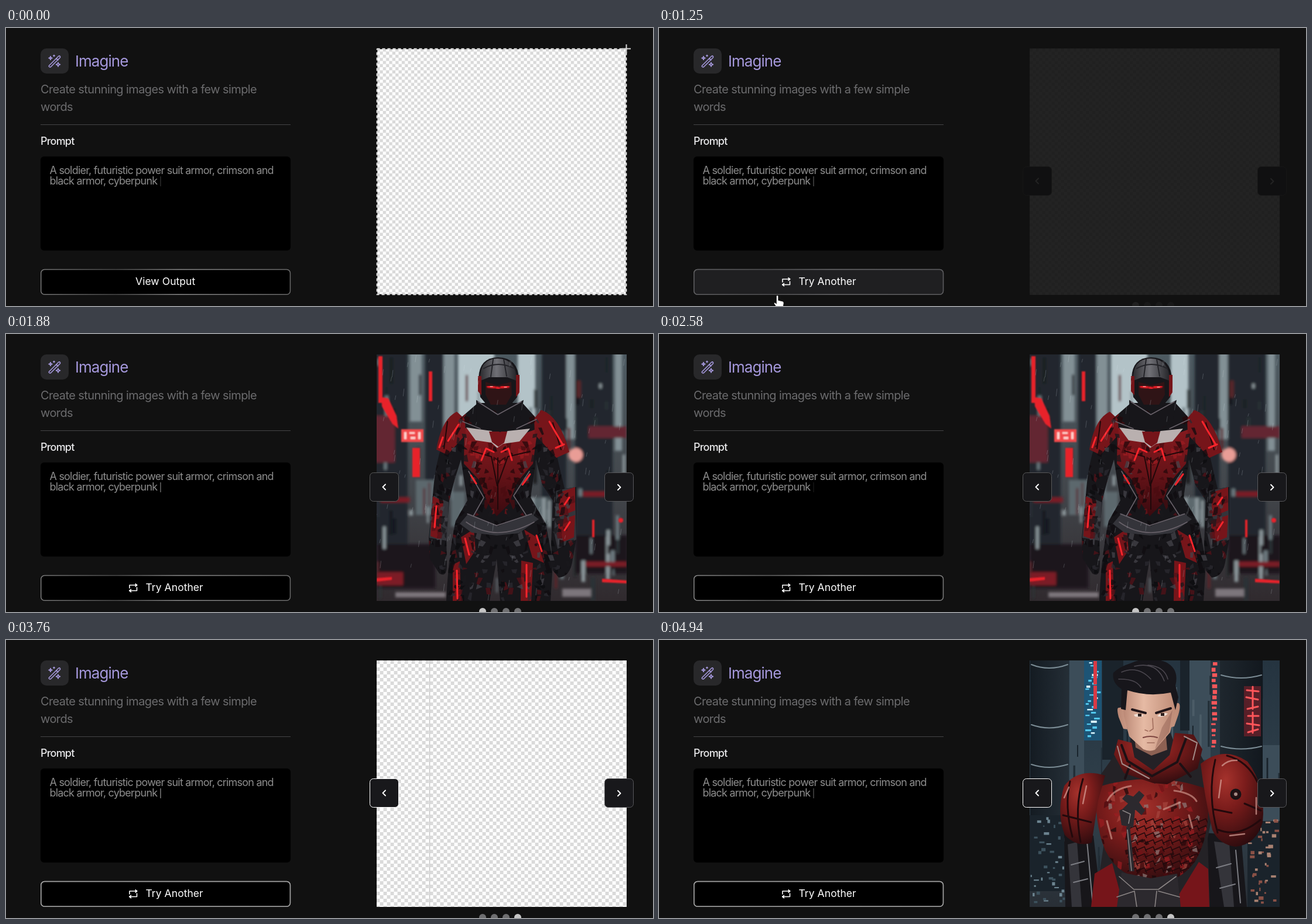
These frames come from a looping animation (1105 by 476 pixels, 5.01 s). An HTML page:

```html
<!DOCTYPE html>
<html lang="en">
<head>
<meta charset="utf-8">
<title>Imagine</title>
<style>
html,body{margin:0;width:100%;height:100%;overflow:hidden;background:#111}
svg{display:block;width:100vw;height:100vh}
text{font-family:Inter,Roboto,sans-serif;white-space:pre}
.line{fill:none;stroke-linecap:round;stroke-linejoin:round}
.steel{fill:#34343a}.dark{fill:#17161a}.red{fill:#76151a}.hot{fill:#e8232b}
</style>
</head>
<body>
<svg viewBox="0 0 1105 476" xmlns="http://www.w3.org/2000/svg">
<defs>
  <pattern id="fine" x="633" y="35" width="10.7" height="10.7" patternUnits="userSpaceOnUse">
    <path fill="#fff" d="M0 0h10.7v10.7H0z"/><path fill="#d9d9d9" d="M0 0h5.35v5.35H0zM5.35 5.35h5.35v5.35H5.35z"/>
  </pattern>
  <pattern id="coarse" x="633" y="35" width="12" height="12" patternUnits="userSpaceOnUse">
    <path fill="#fff" d="M0 0h12v12H0z"/><path fill="#dadada" d="M0 0h6v6H0zM6 6h6v6H6z"/>
  </pattern>
  <linearGradient id="rim"><stop stop-color="#777"/><stop offset=".3" stop-color="#4a4a4a"/><stop offset=".55" stop-color="#8c8c8c"/><stop offset="1" stop-color="#6a6a6a"/></linearGradient>
  <linearGradient id="street" x2="0" y2="1"><stop stop-color="#4d5a61"/><stop offset=".55" stop-color="#42464b"/><stop offset="1" stop-color="#302a2e"/></linearGradient>
  <linearGradient id="night" x2="0" y2="1"><stop stop-color="#253440"/><stop offset=".6" stop-color="#30404b"/><stop offset="1" stop-color="#292f36"/></linearGradient>
  <linearGradient id="pipe"><stop stop-color="#141b22"/><stop offset=".4" stop-color="#3b4852"/><stop offset="1" stop-color="#12181e"/></linearGradient>
  <linearGradient id="dome"><stop stop-color="#2d2d31"/><stop offset=".45" stop-color="#707076"/><stop offset="1" stop-color="#252529"/></linearGradient>
  <linearGradient id="vest" x2="0" y2="1"><stop stop-color="#861a1f"/><stop offset=".5" stop-color="#681318"/><stop offset="1" stop-color="#390a0f"/></linearGradient>
  <radialGradient id="plate" cx=".4" cy=".28" r=".8"><stop stop-color="#a5322c"/><stop offset=".4" stop-color="#7a1c1b"/><stop offset="1" stop-color="#260a0d"/></radialGradient>
  <linearGradient id="skin"><stop stop-color="#b98673"/><stop offset=".4" stop-color="#e6baa4"/><stop offset="1" stop-color="#bd8a75"/></linearGradient>
  <filter id="soft"><feGaussianBlur stdDeviation="2"/></filter>
  <filter id="glow"><feGaussianBlur stdDeviation="1.2"/></filter>
  <path id="suit" d="M775 145L806 118H882L908 147 938 196Q948 240 954 265L974 262 974 350 968 385Q964 416 944 417L934 405 931 360 934 285 916 258 905 215 896 280 922 325 934 390 930 457H844L838 385 826 457H752Q755 380 768 320L788 285 777 215 766 250 757 285 752 350 753 395Q753 418 740 410L724 385 722 350 729 276Q732 230 743 195Z"/>
  <path id="bodice" d="M748 252Q845 222 936 255Q945 330 915 380Q885 420 842 412Q785 408 762 360Q742 310 748 252Z"/>
  <clipPath id="frame"><path d="M633 35h427v422H633z"/></clipPath>
  <clipPath id="suitClip"><use href="#suit"/></clipPath>
  <clipPath id="bust"><use href="#bodice"/></clipPath>

  <g id="art1" clip-path="url(#frame)">
    <path fill="url(#street)" d="M633 35h427v422H633z"/>
    <g filter="url(#soft)">
      <path fill="#b3c3c8" d="M772 30h62v130h-62zM874 30h30v115h-30z"/>
      <path fill="#829095" d="M690 30h20v120h-20zM748 30h18v150h-18zM957 30h14v150h-14zM1040 30h12v170h-12z"/>
      <path fill="#20282d" d="M628 30h58v330h-58zM716 30h30v230h-30zM915 30h42v300h-42zM972 30h64v370h-64z"/>
      <path fill="#5b676d" d="M700 250h36v60h-36zM760 270h24v60h-24zM900 280h30v40h-30z"/>
      <path fill="#1e181c" d="M633 360h100v75H633zM972 345h90v65h-90z"/>
      <path fill="#7d767b" d="M665 442h86v9h-86zM950 436h50v14h-50z"/>
      <g id="streaks"></g>
      <path fill="#7b1d25" d="M633 408h45v22h-45zM640 280h50v8h-50zM985 270h60v8h-60zM990 390h70v8h-70z"/>
      <circle cx="973" cy="207" r="12" fill="#e99d96"/><path fill="#632730" d="M628 140h36v80h-36zM995 158h65v20h-65z"/>
    </g>
    <g filter="url(#glow)" class="hot">
      <path d="M636 38h7v80h-7zM641 108l12 2 14 30 3 22-10-8-18-30zM722 64h6v51h-6zM694 195h13v50h-13z"/>
      <path fill="#f0484c" d="M675 163h38v22h-38z"/><path fill="#ffd0cc" d="M680 168h4v12h-4zM689 168h9v3h-9zM691 176h8v4h-8zM704 168h4v12h-4z"/>
      <path d="M1018 419l42 3v5l-42-2zM633 418l26-2v5l-26 3z"/><circle cx="1050" cy="319" r="4"/><path d="M963 300h5v18h-5zM1001 318h4v30h-4z"/>
    </g>
    <use href="#suit" class="dark"/>
    <path class="steel" d="M729 276l27 12-3 66-30-5zM940 268l32-6 2 90-32 16-6-28z"/>
    <path class="red" d="M729 278l18 8-6 66-16-6zM943 272l29-10v40l-27 11zM942 320l30-10-2 38-23 10zM777 348l22-14 3 36-16 24zM885 335l20 12 14 45-20-9zM763 395l12-6 2 68h-14zM880 388l20 4-3 65h-18z"/>
    <path fill="url(#vest)" d="M783 160L845 185 908 162 900 222 872 255 860 290 838 312 822 288 808 250 782 222Z"/>
    <path class="red" d="M770 133Q744 145 735 198L754 207 785 172 784 146ZM914 130Q946 141 962 202L940 212 903 172 902 145Z"/>
    <g id="mail" clip-path="url(#suitClip)" opacity=".75"></g>
    <path fill="#b9b0af" d="M786 160l43 6 14 8 14-8 38-4-18 22-28 4-10 7-10-9-27-4z"/>
    <path class="red" d="M825 167h31l-5 19-10 7-11-8z"/>
    <path class="dark" d="M803 113l37 23 44-23-7 38-33 17-40-15z"/>
    <path class="steel" d="M790 307l50 22 56-22 14 10-34 24-38 4-43-5-20-15z"/>
    <path class="line" stroke="#69626a" stroke-width="1.6" d="M806 116l34 22 40-22M780 150l30 12M872 162l34-16M790 235l26 45-18 32M894 235l-27 42 22 34M788 308l50 20 60-20M786 322q50 36 116 0"/>
    <path class="line" stroke="#20080a" stroke-width="2" d="M795 200l34 10 10 50 18-50 38-9M840 212v88M754 150l-6 46M934 152l14 46"/>
    <path class="line" stroke="#ff252c" stroke-width="3" d="M746 177l-6 17M773 155l-18 28M928 150l22 38M939 195l14-6M794 242l9 14M895 240l-13 18M735 295l-3 36M962 280l-8 12M963 322l-9 14M784 350l7 28M906 345l9 27M770 405l1 48M889 395v55M812 216l8-20 13 6M864 216l-6-20-12 6"/>
    <path class="dark" d="M807 76Q808 40 841 40 875 41 876 78L873 108 858 126H825L810 108Z"/>
    <path fill="url(#dome)" d="M810 80Q808 42 840 42 872 43 872 80L856 74H825Z"/>
    <path class="line" stroke="#242429" stroke-width="2" d="M832 43l-4 30M850 43l5 29M816 59q24-14 52 0"/>
    <path fill="#2f1416" d="M819 82l20 6 24-6 1 22-10 17h-26l-9-17z"/>
    <path class="red" d="M806 72h6v33l-6-7zM871 70h6v30l-6 8z"/>
    <path class="line" stroke="#ff1f28" stroke-width="4" filter="url(#glow)" d="M823 90l11 1M846 91l12-1M838 92l4 1"/><path class="line" stroke="#ff9a95" stroke-width="1.5" d="M827 90h4M851 91h4"/>
    <g id="rain" stroke="#dce8ee" stroke-width=".8" opacity=".28"></g>
  </g>

  <g id="art2" clip-path="url(#frame)">
    <path fill="url(#night)" d="M633 35h427v422H633z"/>
    <path fill="#3c4d59" d="M701 35h25v260h-25zM904 35h38v170h-38zM1030 180h30v130h-30z"/>
    <g id="ribs"></g>
    <path fill="url(#pipe)" d="M634 35h66v280h-66zM958 35h73v220h-73z"/>
    <path fill="#1a232b" d="M757 35h36v170h-36zM890 35h16v120h-16zM633 300h70v130h-70zM1005 310h55v147h-55z"/>
    <path class="line" stroke="#7b8c95" stroke-width="2" d="M636 42q30 12 62 0M636 145q30 11 62 0M636 213q30 10 62 0M960 60q34 10 69 0M960 182q34 9 69 0"/>
    <g id="windows"></g>
    <path fill="#1d5475" d="M726 35h30v137h-30z"/><g id="signs"></g>
    <path fill="#571f28" d="M999 79h29v86h-29z"/>
    <path class="line" stroke="#ff565a" stroke-width="3" d="M1004 86l20 2M1014 80v38M1003 98l20 4M1005 118l18-4M1006 130h18M1014 124v35M1004 143l21 3M1006 158l17-5"/>
    <path class="dark" d="M692 330l50 5 14 122h-62zM932 330l62 5 10 122h-65z"/>
    <path class="steel" d="M698 350l16-4 8 111h-17zM948 345l26 3 8 109h-17z"/>
    <path class="line" stroke="#7c7d83" stroke-width="2" d="M731 345l10 110M985 360l8 90M704 385l22-6M952 390l25-7M708 415l24-6M958 425l26-7"/>
    <path fill="#242226" d="M744 245l32-45 145-10 34 60-18 90 4 117H744l16-110z"/>
    <path class="red" d="M744 400l30-18 20 75h-56zM922 380l16 12 2 65h-65z"/>
    <use href="#bodice" fill="url(#plate)"/>
    <g clip-path="url(#bust)"><g id="dents" opacity=".7"></g><g id="scales" fill="none" stroke="#22090c" stroke-width="1.5"></g></g>
    <path class="line" stroke="#d39a90" stroke-width="3" opacity=".65" d="M766 275q10-20 40-25M880 258q30 4 38 18M765 310l8 30M862 290l28-12M905 300l6 22"/>
    <path fill="#2c292e" d="M798 264l12 4 10-10 9 8-9 12 10 14-6 8-10-9-16 11-10-9 13-13-10-8zM786 292l19-9 8 10-3 28-20-4zM790 398l50 10 45-8 6 57H782zM798 320l6-2 8 78h-9z"/>
    <path class="line" stroke="#8b8585" stroke-width="1.6" d="M792 292l13 6-3 16M786 405l25 22h42l30-22M812 430l4 27M850 430l-3 27M782 440l30-10M853 430l36 10M800 325l7 70"/>
    <path fill="url(#plate)" d="M762 232Q716 218 692 250 678 295 693 334 715 356 739 347L750 275Z"/>
    <path fill="url(#plate)" d="M925 212Q964 180 1005 208 1037 250 1031 312 1020 350 985 354 956 350 945 325 932 270 925 212Z"/>
    <path class="line" stroke="#22090c" stroke-width="3" d="M702 242q-10 42 4 95M724 238q-15 50-4 108M950 205q-14 60 4 125M970 198q35 9 52 45M955 325q35 14 72-17M690 300l48 12M948 290l30 6M1000 280l28 12"/>
    <path class="line" stroke="#d9a39b" stroke-width="2.5" opacity=".7" d="M692 270l8-18M962 215q10-10 25-9M1020 270v28M730 250l-6 30M960 240l-4 30M975 335l25-3"/>
    <circle cx="985" cy="264" r="8" fill="#261114" stroke="#171215" stroke-width="3"/><circle cx="985" cy="264" r="3" fill="#a68c87"/>
    <path fill="#242126" d="M806 165l68-5 18 48-45 38-48-30z"/>
    <path fill="url(#plate)" d="M784 170l23 6 5 25 32 22 28-26 9-38 32 3 15 25-8 33-52 27-24-2-50-17-17-32z"/>
    <path class="line" stroke="#1d1014" stroke-width="4" d="M790 180l10 27 42 26 43-24 15-40M804 215l-8 22M890 212l18 22"/>
    <path class="line" stroke="#a28b88" stroke-width="2" d="M783 182l8 30 46 25M897 165l22 11-7 29"/>
    <path fill="#8d6153" d="M811 155h54l3 33-27 10-27-14z"/>
    <path fill="url(#skin)" d="M785 116q-4 0 0 16l8 20 7 1-7-38zM887 108q5 2 0 20l-7 20-8 2 8-42z"/>
    <path fill="url(#skin)" d="M791 90Q820 76 880 82L883 117 873 158 847 188Q838 192 827 187L803 165 794 130Z"/>
    <path fill="#17161b" d="M789 118l1-34Q773 73 776 56 788 45 805 40 835 26 866 38 889 50 882 78L887 98 882 120 874 90Q836 98 800 86L797 120Z"/>
    <path class="line" stroke="#4b474f" stroke-width="1.6" d="M790 55q28-12 50 12M812 45q38-9 51 25M835 43q28 2 34 24M785 67q29-1 38 14"/>
    <path class="line" stroke="#211519" stroke-width="4" d="M808 119l23 6M849 125l25-8"/>
    <path fill="#f0dfd5" d="M811 128q9-4 17 2-8 3-15 1zM851 130q8-7 18-4-6 7-16 5z"/><path fill="#30211e" d="M818 126h6v5h-6zM857 125h6v5h-6z"/>
    <path class="line" stroke="#a06c5c" stroke-width="1.6" d="M843 134l1 18-6 4M830 154l5 2M834 176h12"/>
    <path class="line" stroke="#7d4540" stroke-width="2.2" d="M827 167q12-4 24 0"/>
    <path fill="#7b4c42" opacity=".35" d="M877 120l-6 38-24 29 12-37z"/>
  </g>
  <g id="blank"><path fill="url(#coarse)" d="M633 35h427v422H633z"/><path stroke="#ddd" d="M633.5 35v422"/></g>
</defs>

<path fill="#111" d="M0 0h1105v476H0z"/>
<rect x="59" y="35" width="48" height="43" rx="10" fill="#28282a"/>
<g class="line" stroke="#a598dc" stroke-width="1.6">
  <path d="M73.5 64.5L89.5 48.5Q91 47 92 48.2L92.5 49Q93 50 92 51L76.5 66.5Q75 67.5 73.8 66.5 72.8 65.5 73.5 64.5ZM86 52l3 3"/>
  <path d="M76 48.5l.8 2.2 2.2.8-2.2.8-.8 2.2-.8-2.2-2.2-.8 2.2-.8zM82 46.2v2.6M80.700 47.5h2.6M89 59l1 2.5 2.5 1-2.5 1-1 2.5-1-2.5-2.5-1 2.5-1z"/>
</g>
<text x="118" y="65.5" font-size="26" letter-spacing="-.95" fill="#a598dc">Imagine</text>
<g font-size="20" letter-spacing="-.6" fill="#6b6b6d"><text x="59" y="112">Create stunning images with a few simple</text><text x="59" y="142">words</text></g>
<path stroke="#444446" d="M59 165.5h427"/>
<text x="59" y="200" font-size="18" letter-spacing="-.8" font-weight="500" fill="#e8e8ea">Prompt</text>
<rect x="59" y="220" width="427" height="161" rx="6"/>
<g font-size="18" letter-spacing="-.79" fill="#8d8d8d"><text x="74.5" y="250">A soldier, futuristic power suit armor, crimson and</text><text x="74.5" y="268">black armor, cyberpunk</text></g>
<path id="caret" stroke="#9a9a9a" stroke-width="1.2" d="M264 254v17"/>

<g stroke-width="1.5">
  <rect x="59.75" y="413.6" width="425.7" height="42.7" rx="6" stroke="url(#rim)"/>
  <rect id="bright" x="59.75" y="413.6" width="425.7" height="42.7" rx="6" fill="none" stroke="#a3a3a3"/>
  <rect id="hover" x="59.75" y="413.6" width="425.7" height="42.7" rx="6" fill="#303032" stroke="#56565a"/>
</g>
<g font-size="17.6" fill="#fff">
  <text id="view" y="440">View Output</text>
  <g id="again"><text x="238.5" y="440">Try Another</text><path class="line" stroke="#fff" stroke-width="1.6" d="M211 435v-5h12.5M221 427.8l2.8 2.2-2.8 2.2M223.5 434v5.5H211M213.5 437.3l-2.8 2.2 2.8 2.2"/></g>
</g>
<g id="spinner" class="line" stroke-width="2"><circle cx="324" cy="435" r="13" stroke="#525256"/><circle id="arc" cx="324" cy="435" r="13" stroke="#fff" stroke-linecap="butt" transform="rotate(-90 324 435)"/></g>

<g id="panel">
  <g clip-path="url(#frame)"><g id="strip">
    <path fill="url(#fine)" d="M633 35h427v422H633z"/>
    <use id="shot1" href="#art1"/>
    <use href="#blank" x="427"/><use href="#blank" x="854"/><use href="#blank" x="1281"/>
    <use id="shot2" href="#art2" x="1281"/>
  </g></g>
  <g id="ants" fill="none" stroke-width="1.6"><path stroke="#111" d="M633.5 35.5h426v421h-426z"/><path id="dash" stroke="#fff" stroke-dasharray="5 4" d="M633.5 35.5h426v421h-426z"/></g>
  <path id="cross" stroke="#d5d5d5" stroke-width="2" d="M1059.5 28v15M1052 35.5h15"/>
  <g id="nav">
    <g fill="#18181b" stroke="#58585b"><rect id="prev" x="621.5" y="237.5" width="49" height="49" rx="6"/><rect x="1022.5" y="237.5" width="49" height="49" rx="6"/></g>
    <path class="line" stroke="#fff" stroke-width="1.9" d="M648 257.5l-4.5 4.5 4.5 4.5M1045 258l4.5 4.5-4.5 4.5"/>
    <g id="dots"></g>
  </g>
</g>
<path id="hand" fill="#fff" stroke="#111" stroke-width=".8" d="M-1.7 1.5a1.7 1.7 0 0 1 3.4 0v6.8l7.3 1.6q2.2.6 2.1 3l-.8 5.6-1.8 4.2h-8l-6-8.5q-.8-2 1-2 1.6.2 2.8 2z"/>
</svg>
<script>
const LOOP = 5010, SLIDE = 427;
const $ = id => document.getElementById(id);
const set = (id, name, value) => $(id).setAttribute(name, value);
const show = (id, on) => set(id, 'display', on ? 'inline' : 'none');

// Linear interpolation through [time, value] keys.
function track(t, keys) {
  if (t <= keys[0][0]) return keys[0][1];
  for (let i = 1; i < keys.length; i++) {
    const [a, u] = keys[i - 1], [b, v] = keys[i];
    if (t < b) return u + (v - u) * (t - a) / (b - a);
  }
  return keys[keys.length - 1][1];
}

let seed = 7;
const rnd = (a, b) => {
  seed = (seed * 16807) % 2147483647;
  return a + (b - a) * seed / 2147483647;
};
const pick = list => list[Math.floor(rnd(0, list.length))];
const fill = (id, n, make) => $(id).innerHTML = Array.from({length: n}, (_, i) => make(i)).join('');
const box = (x, y, w, h, color) => `<rect x="${x}" y="${y}" width="${w}" height="${h}" fill="${color}"/>`;
const shard = (x, y, color) =>
  `<path fill="${color}" d="M${x} ${y}l${rnd(3, 10)} ${rnd(-5, 3)} ${rnd(-3, 4)} ${rnd(4, 12)} ${rnd(-9, -3)} ${rnd(-2, 5)}z"/>`;

const RED = ['#9c1d22', '#4a0c11', '#25080b', '#741318', '#17090b'];
const DARK = ['#0d0c0f', '#1a191d', '#2b2a30', '#45434a', '#100d10', '#541218'];

fill('streaks', 90, () => box(rnd(633, 1058), rnd(40, 420), rnd(2, 7), rnd(8, 50),
  pick(['#1a2024', '#6d7a80', '#2a3136', '#12171a', '#5a252b', '#8c979b'])));
// Armour facets mirrored about the body's centre line.
fill('mail', 260, () => {
  const dx = rnd(0, 125), y = rnd(125, 457);
  const facet = shard(840 + dx, y, pick(y < 300 && dx < 60 - (y - 160) * .3 ? RED : DARK));
  return facet + `<g transform="matrix(-1 0 0 1 1686 0)">${facet}</g>`;
});
fill('rain', 110, () => `<path d="M${rnd(633, 1060)} ${rnd(35, 450)}l-1.5 ${rnd(5, 13)}"/>`);
fill('ribs', 60, () => box(rnd(633, 1058), rnd(35, 400), rnd(1, 4), rnd(20, 80), pick(['#18222a', '#4b5c67', '#222e37'])));
fill('windows', 80, i => box(i % 2 ? rnd(634, 695) : rnd(1006, 1055), rnd(300, 450), rnd(2, 9), rnd(2, 6),
  ['#8a5146', '#6c8490', '#a98272', '#3d525e'][i % 4]));
fill('signs', 44, i => i < 26
  ? box(rnd(728, 744), 38 + i * 5, rnd(5, 11), rnd(2, 4), i % 4 ? '#52c8ee' : '#d8f5ff')
  : i < 42 ? box(rnd(943, 946), 38 + (i - 26) * 9.5, rnd(6, 10), rnd(3, 7), '#f4575a')
  : box(742, 36 + (i - 42) * 42, 6, 40, '#d83a45'));
fill('dents', 130, () => shard(rnd(745, 935), rnd(240, 410), pick([...RED, '#a5453e', '#8d7b79'])));
fill('scales', 72, i => {
  const x = 800 + i % 9 * 15, y = 312 + Math.floor(i / 9) * 12;
  return `<path d="M${x} ${y}l14 -6 4 9"/>`;
});
fill('dots', 4, i => `<circle cx="${814 + i * 20}" cy="475" r="6"/>`);

const caretKeys = [[0, .35], [150, 0], [250, 0], [600, 1], [1140, 1], [1400, .05], [1480, .1], [1960, 1], [2400, 1], [2620, 0],
  [2700, 0], [3100, 1], [3790, 1], [4070, 0], [4200, 0], [4590, 1], [4880, 1], [4940, .6], [LOOP, .35]];
const handX = [[300, 300], [580, 224], [720, 195], [1180, 195], [1380, 215]];
const handY = [[300, 478], [580, 456], [720, 447], [1180, 447], [1380, 478]];

function slideOffset(t) {
  const s = Math.max(0, t - 3560) * .0215;
  return 3 * SLIDE * (1 - (1 + s) * Math.exp(-s));
}

function draw(t) {
  const done = t >= 1210, loading = t >= 970 && !done, clicked = t >= 3560;

  set('caret', 'opacity', track(t, caretKeys));
  set('bright', 'opacity', track(t, [[1700, 0], [2440, .15], [3400, 1]]));
  set('hover', 'opacity', track(t, [[600, 0], [720, 1], [1200, 1], [1350, 0]]));
  show('view', !done);
  set('view', 'x', loading ? 196 : 221);
  show('again', done);
  show('spinner', loading);
  set('arc', 'stroke-dasharray', `${81.7 * track(t, [[970, .01], [1210, 1]])} 82`);

  set('panel', 'opacity', track(t, [[1060, 1], [1190, 0], [1460, .36], [1850, 1]]));
  show('ants', t < 1100);
  show('cross', t < 1100);
  set('dash', 'stroke-dashoffset', -t * 9 / 490);
  show('nav', t >= 1190);
  set('shot1', 'opacity', track(t, [[1690, 0], [1800, 1]]));
  show('shot2', t >= 3870);
  set('strip', 'transform', `translate(${-slideOffset(t).toFixed(2)} 0)`);
  const grey = track(t, [[3180, 88], [3350, 130]]);
  set('prev', 'stroke', clicked ? '#fff' : `rgb(${grey},${grey},${grey})`);
  [...$('dots').children].forEach((dot, i) =>
    dot.setAttribute('fill', i === (clicked ? 3 : 0) ? '#c6c6c6' : '#6e6e70'));

  const second = t >= 2720;
  show('hand', t > 300 && t < 1380 || second && t < 3650);
  const x = second ? track(t, [[2720, 812], [3200, 634]]) : track(t, handX);
  const y = second ? track(t, [[2720, 330], [3200, 260]]) : track(t, handY);
  set('hand', 'transform', `translate(${x} ${y})`);
}

const start = performance.now();
function tick() {
  draw((performance.now() - start) % LOOP);
  requestAnimationFrame(tick);
}
tick();
</script>
</body>
</html>
```
